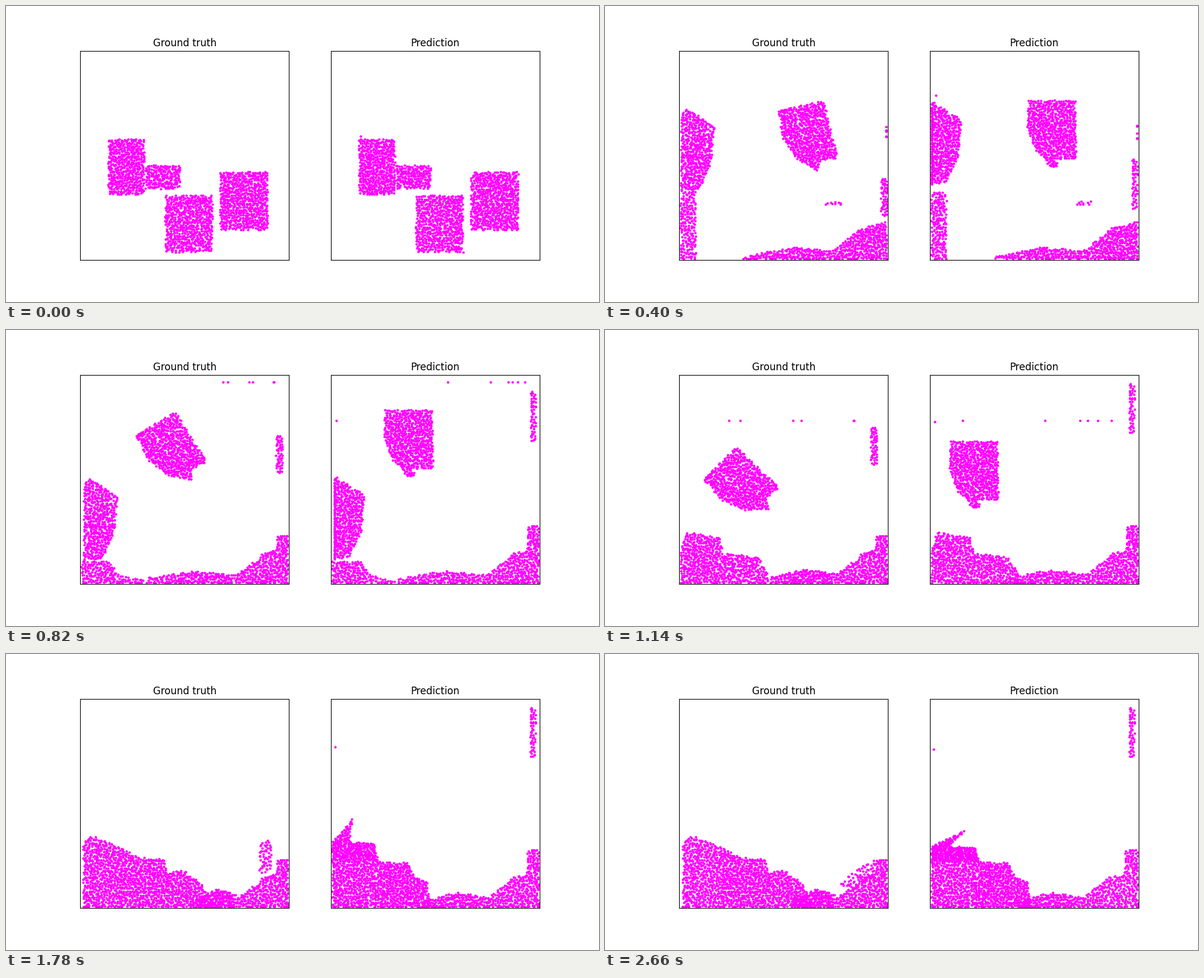
These frames come from a looping animation (1000 by 500 pixels, 2680 ms). A matplotlib script:

```python
import numpy as np
import matplotlib.pyplot as plt
from matplotlib.animation import FuncAnimation
from matplotlib.path import Path

FRAMES, INTERVAL = 134, 20
SIDE = 352.27             # box width in px; the origin is its lower left corner
HALF_G = 0.1205           # half of gravity, px per frame squared
N_TALL, N_SMALL, N_LOW, N_BLOCK, N_CHUNK, N_DEBRIS = 485, 187, 540, 650, 52, 9
rng = np.random.default_rng(7)


def rect(x0, y0, x1, y1):
    return [(x0, y0), (x1, y0), (x1, y1), (x0, y1)]


def heap(*tops):
    """Region between the floor and a surface through a few points."""
    return [(tops[0][0], 0), *tops, (tops[-1][0], 0)]


def strip_order(points):
    """Order grains by column, then by height."""
    columns = np.array_split(np.argsort(points[:, 0]), max(1, round(len(points) ** 0.5)))
    return np.concatenate([c[np.argsort(points[c, 1])] for c in columns])


def fill(polygon, n):
    """Scatter n evenly spread grains inside a polygon."""
    poly = np.array(polygon, float)
    x, y = poly.T
    area = abs(np.sum(x * np.roll(y, -1) - y * np.roll(x, -1))) / 2
    step = 1.06 * np.sqrt(area / n)
    lo, hi = poly.min(0), poly.max(0)
    while True:
        gx, gy = np.meshgrid(np.arange(lo[0] - step, hi[0] + step, step),
                             np.arange(lo[1] - step, hi[1] + step, step))
        gx = gx + step / 2 * (np.arange(len(gx)) % 2)[:, None]
        grid = np.column_stack([gx.ravel(), gy.ravel()])
        grid += rng.uniform(-0.42, 0.42, grid.shape) * step
        inside = grid[Path(poly).contains_points(grid)]
        if len(inside) >= n:
            points = rng.permutation(inside)[:n]
            return points[strip_order(points)]
        step *= 0.98


def onto(points, polygon):
    """Move grains into a new region, keeping their left-right and layer order."""
    moved = np.empty_like(points)
    moved[strip_order(points)] = fill(polygon, len(points))
    return moved


def track(*keys):
    """Monotone cubic motion through (frame, grains) keys."""
    t = np.array([k[0] for k in keys], float)
    p = np.array([k[1] for k in keys], float)
    slope = np.diff(p, axis=0) / np.diff(t)[:, None, None]
    a, b = slope[:-1], slope[1:]
    same = a * b > 0
    inner = np.where(same, 2 * a * b / np.where(same, a + b, 1), 0)
    m = np.concatenate([slope[:1], inner, slope[-1:]])

    def at(frame):
        if frame >= t[-1]:
            return p[-1]
        k = np.searchsorted(t, frame, side="right") - 1
        h = t[k + 1] - t[k]
        s = (frame - t[k]) / h
        return ((1 + 2 * s) * (1 - s) ** 2 * p[k] + s * (1 - s) ** 2 * h * m[k]
                + s * s * (3 - 2 * s) * p[k + 1] + s * s * (s - 1) * h * m[k + 1])
    return at


def creep(p, amount, wall=0, ramp=60):
    """Sideways shift that fades out towards a wall."""
    reach = np.clip(np.abs(p[:, 0] - wall) / ramp, 0, 1)
    return p + np.outer(amount * reach, (1, 0))


def squeeze(p, start, pivot=262):
    """Press the thin floor layer left of the pivot together, making it thicker."""
    x, y = p.T
    scale = (pivot - start) / (pivot - x.min())
    thin = x < pivot
    return np.column_stack([np.where(thin, pivot - (pivot - x) * scale, x),
                            np.where(thin, y / scale ** 0.5, y)])


def topple(p):
    """Sag the tall part of a mound and tip its peak to the right."""
    x, y = p.T
    return np.column_stack([x + 13 * np.minimum(x / 60, 1) + 0.8 * np.maximum(y - 128, 0),
                            y - 0.45 * np.maximum(y - 78, 0)])


def thrown_block(velocity, spin):
    whole = fill(rect(-40, -49, 40, 49), N_BLOCK)
    chipped = onto(whole, [(-40, 48), (40, 48), (42, -51), (12, -51), (8, -64),
                           (-6, -64), (-10, -52), (-26, -38), (-41, 0)])

    def at(t):
        mix = min(t / 10, 1)
        angle = np.radians(max(0, spin * (t - 6)))
        c, s = np.cos(angle), np.sin(angle)
        center = (276 + velocity[0] * t, 99.5 + velocity[1] * t - HALF_G * t * t)
        return ((1 - mix) * whole + mix * chipped) @ np.array([(c, s), (-s, c)]) + center
    return at


def left_sand(lean, drop):
    """Two blocks thrown at the left wall; they slide down and spread."""
    tall = fill(rect(47, 110, 108, 204), N_TALL)
    small = fill(rect(110, 120, 168, 160), N_SMALL)
    wedge = onto(tall, [(3, 116), (3, 248), (12, 256), (59, 226), (54, 165), (34, 120)])
    wedge = np.maximum(wedge + lean, (3, 0))
    slid = np.vstack([wedge + (3, -drop),
                      onto(small, heap((2, 38), (50, 38), (65, 15), (108, 5)))])
    return track((0, np.vstack([tall, small])),
                 (20, np.vstack([wedge, onto(small, rect(2, 1, 28, 116))])),
                 (41, slid),
                 (57, onto(slid, heap((2, 56), (13, 84), (70, 74), (75, 48), (135, 41),
                                      (152, 20)))))


def left_pile(ground, block, surface, settle):
    """The flying block drops on the spread sand and both form one mound."""
    keys = [(t, np.vstack([ground(t), block(t)])) for t in range(0, 65, 4)]
    mound = onto(keys[-1][1], heap(*surface))
    return track(*keys, (77, mound), *settle(mound))


def right_sand(bank, start, drift):
    """The lowest block sweeps along the floor and banks up at the right wall."""
    low = fill(rect(143, 13, 216, 109), N_LOW)
    sweep = onto(low, heap((115, 2), (145, 14), (265, 53), (315, 63), (349, 42)))
    surge = onto(sweep, heap((106, 5), (190, 22), (258, 15), (305, 53), (350, 66)))
    rest = onto(surge, heap((112, 10), (195, 22), (262, 16), (285, 32), (308, 52),
                            (330, 57), (332, bank), (350, bank)))
    shorter = squeeze(rest, (112 + start) / 2)
    pressed = squeeze(shorter, start)
    return track((0, low), (10, sweep), (20, surge), (41, rest), (57, shorter),
                 (77, pressed), (133, creep(pressed, drift, 350, 50)))


def wall_chunk(shape, velocity, flight, landing=None):
    """A sliver shot up the right wall; it falls back or sticks to the ceiling."""
    sliver = fill(shape, N_CHUNK)
    base = onto(sliver, rect(216, 13, 223, 109))
    keys = [(0, base), (10, onto(base, rect(338, 2, 350, 75)))]
    for s in np.linspace(0, flight, 9):
        keys.append((20 + s, sliver + (velocity[0] * s, velocity[1] * s - HALF_G * s * s)))
    if landing:
        keys.append((95, onto(keys[-1][1], landing)))
    return track(*keys)


def drops(speeds, release):
    """Loose grains: up the wall, off the ceiling, then ballistic to the floor."""
    speeds = np.array(speeds)
    stagger = rng.uniform(-14, 14, len(speeds))

    def at(t):
        if t < 32:
            y = 347 - 11 * (32 - t) + stagger * min((32 - t) / 12, 1)
        else:
            s = t - 41
            y = np.full(len(speeds), 341 - 2.16 * s - HALF_G * s * s)
        x = min(349, 215 + 9.6 * t) - speeds * max(0, t - release)
        return np.column_stack([np.maximum(x, 6), np.clip(y, 20 if t < 32 else 2, 347)])
    return at


def debris():
    shape = fill(rect(-14, -3, 14, 3), N_DEBRIS)
    return lambda t: shape + (205 + 2.7 * t, max(5, 98 + 2.3 * t - HALF_G * t * t))


def stuck_grain():
    def at(t):
        early = max(0, 10 - t)
        return np.array([(10.5 - 0.032 * t + 4 * early, 279 - 0.086 * t - 7 * early)])
    return at


truth = [
    left_pile(left_sand((0, 0), 77), thrown_block((-3.05, 8.1), 0.88),
              [(3, 106), (14, 123), (40, 112), (93, 85), (133, 82), (138, 59),
               (165, 64), (195, 41), (203, 26)],
              lambda p: [(95, creep(p, 10) + (2, 0))]),
    right_sand(82, 195, 0),
    wall_chunk(rect(340, 74, 351, 140), (-0.47, 7.91), 66,
               [(268, 38), (290, 58), (320, 78), (331, 82), (330, 55), (295, 36)]),
    drops([2, 2.05, 5.3, 5.8, 9.1, 9.8], 30),
    debris()]

prediction = [
    left_pile(left_sand((-6, 11), 86), thrown_block((-3.55, 8.51), 0),
              [(2, 122), (23, 179), (28, 126), (66, 121), (74, 78), (124, 76),
               (132, 54), (155, 45), (158, 20)],
              lambda p: [(106, topple(p)), (133, creep(topple(p), -3))]),
    right_sand(101, 158, -8),
    wall_chunk(rect(341, 84, 350, 170), (-0.2, 9.9), 24),
    drops([1.3, 2, 2.5, 2.9, 4.7, 8.9], 24),
    debris(), stuck_grain()]

fig, axes = plt.subplots(1, 2, figsize=(10, 5), dpi=100)
panels = []
for ax, title, motions in zip(axes, ("Ground truth", "Prediction"), (truth, prediction)):
    ax.set(title=title, xlim=(0, SIDE), ylim=(0, SIDE), xticks=[], yticks=[],
           aspect="equal")
    line, = ax.plot([], [], "o", color="#ff00ff", ms=2)
    panels.append((line, motions))


def draw(frame):
    for line, motions in panels:
        x, y = np.concatenate([at(frame) for at in motions]).T
        line.set_data(np.clip(x, 2, SIDE - 1), np.clip(y, 1.5, SIDE - 5))
    return [line for line, _ in panels]


anim = FuncAnimation(fig, draw, frames=FRAMES, interval=INTERVAL, repeat=True)
plt.show()
```
